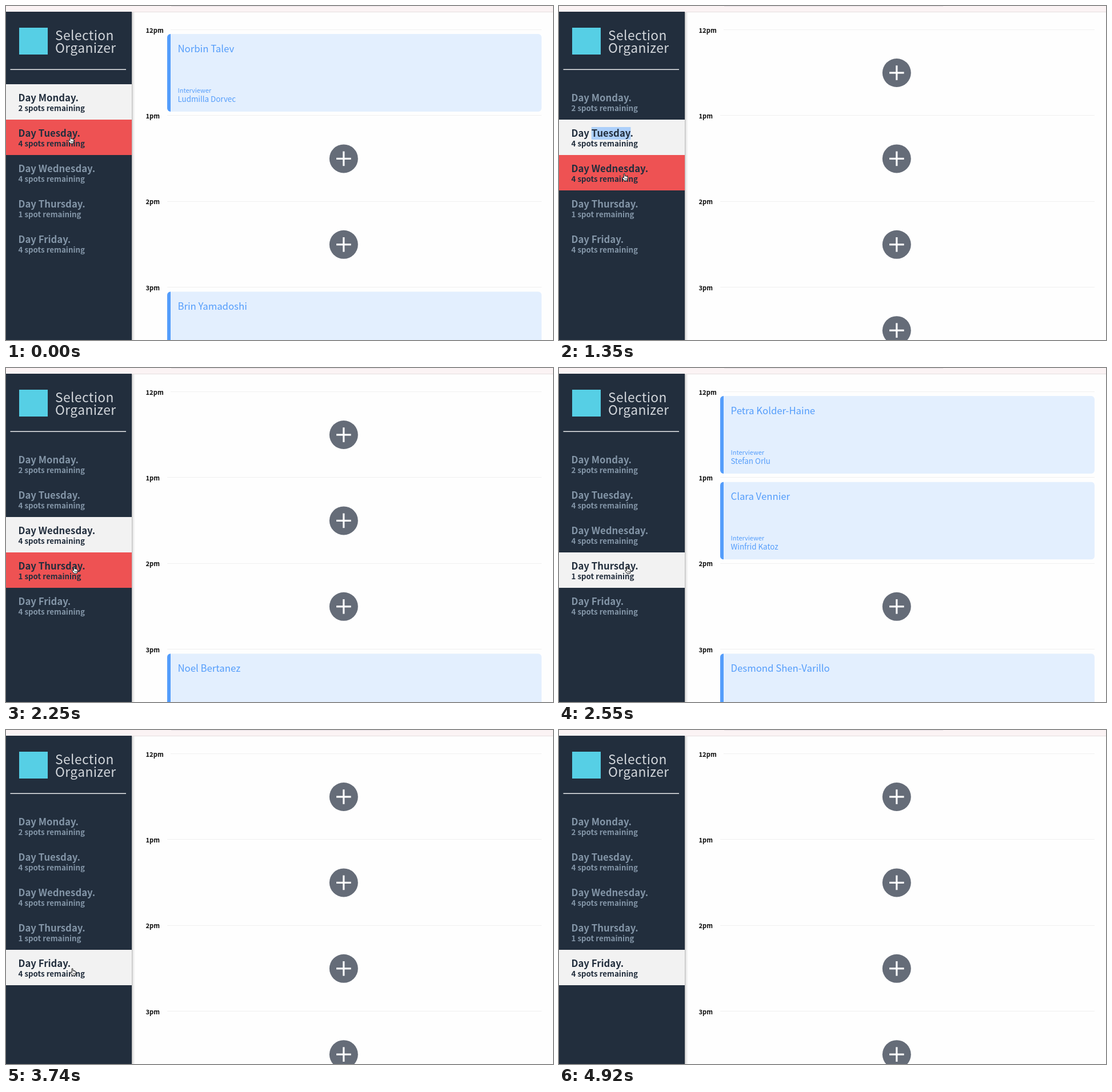
Recreate the animation shown at these times as an HTML page with a canvas. Size 957x585 px, loop 5520 ms.

```html
<!DOCTYPE html>
<html lang="en">
<head>
<meta charset="utf-8">
<title>Day schedule</title>
<style>
  html, body { margin: 0; width: 100%; height: 100%; overflow: hidden; background: #fefefe; }
  canvas { display: block; }
</style>
</head>
<body>
<canvas id="stage" width="957" height="585"></canvas>
<script>
const ctx = document.getElementById('stage').getContext('2d');
const LOOP = 5520;
const SANS = '"Noto Sans CJK JP", "Noto Sans CJK SC", "Noto Sans CJK", "Source Sans Pro", "Noto Sans", sans-serif';
const LIGHT = '"Noto Sans CJK JP Light", "Noto Sans CJK SC Light", ' + SANS;
const NAVY = '#222e3d', MUTED = '#8395a7', PALE = '#f2f2f2', RED = '#ee5253', BLUE = '#549dfb';

const HOURS = ['12pm', '1pm', '2pm', '3pm'];
const ROW = 150.4;
const DAYS = [
  { name: 'Monday', spots: 2, booked: { 0: ['Norbin Talev', 'Ludmilla Dorvec'], 3: ['Brin Yamadoshi'] } },
  { name: 'Tuesday', spots: 4, booked: {} },
  { name: 'Wednesday', spots: 4, booked: { 3: ['Noel Bertanez'] } },
  { name: 'Thursday', spots: 1, booked: {
    0: ['Petra Kolder-Haine', 'Stefan Orlu'],
    1: ['Clara Vennier', 'Winfrid Katoz'],
    3: ['Desmond Shen-Varillo'] } },
  { name: 'Friday', spots: 4, booked: {} }
];

// Each step starts with its time in ms.
const SELECTED = [[0, 0], [600, 1], [1650, 2], [2550, 3], [3740, 4]];
const HOVERED = [[0, 1], [1050, 2], [2250, 3], [2990, 4]];
const POINTER = [
  [0, 108.5, 228], [1050, 113, 294.5], [1350, 110, 293], [2100, 114.5, 314.5],
  [2250, 115, 347], [2840, 118.5, 384.5], [2990, 115, 407], [3140, 111, 415],
  [3290, 112, 417], [4040, 188.5, 415], [4180, 814.5, 518.5], [4330, 821.5, 522.5],
  [4470, 889.5, 552.5], [4620, 906.5, 569.5], [4770, 911.5, 580.5], [4920, 0, 700]
];

const HAND = new Path2D('M3.1 1.3Q4 0 5 1.2L5.3 5Q6.3 4.2 7 5.2Q8.1 4.6 8.7 5.7Q10.3 5.3 10.4 7L10.1 10L9 13L4.2 13L1 8.8Q0 7 1.7 6.9L3.5 8Z');
const ARROW = new Path2D('M0 0V12L2.8 9.5L4.6 13.4L6.5 12.6L4.8 8.8L8.7 8.6Z');

const stepAt = (steps, t) => steps.findLast(s => s[0] <= t);

function rect(x, y, w, h, color) {
  ctx.fillStyle = color;
  ctx.fillRect(x, y, w, h);
}

function text(str, x, y, size, weight, color, family = SANS) {
  ctx.font = `${weight} ${size}px ${family}`;
  ctx.fillStyle = color;
  ctx.fillText(str, x, y);
}

function drawAddButton(y) {
  ctx.fillStyle = '#656c78';
  ctx.beginPath();
  ctx.arc(590.8, y, 25, 0, Math.PI * 2);
  ctx.fill();
  rect(578, y - 1.6, 25.6, 3.2, '#fff');
  rect(589.2, y - 12.8, 3.2, 25.6, '#fff');
}

function drawCard(y, [guest, host]) {
  ctx.save();
  ctx.beginPath();
  ctx.roundRect(282, y, 655, 136, 6);
  ctx.clip();
  rect(282, y, 655, 136, '#e3effe');
  rect(282, y, 6, 136, BLUE);
  ctx.restore();
  text(guest, 300.5, y + 31.5, 16.75, 400, BLUE);
  if (host) {
    text('Interviewer', 300.5, y + 103, 11, 300, BLUE, LIGHT);
    text(host, 300.5, y + 118.5, 13.35, 400, BLUE);
  }
}

function drawSchedule(booked) {
  HOURS.forEach((hour, i) => {
    const y = 41.5 + i * ROW;
    text(hour, 244.5, y + 5, 11.2, 700, '#0b0b0b');
    rect(i ? 282 : 288, Math.floor(y), 937 - (i ? 282 : 288), 1, '#f0f0f0');
    if (booked[i]) drawCard(y + 7.5, booked[i]);
    else drawAddButton(y + 75.5);
  });
}

function drawDay(day, i, selected, hovered, marked) {
  const y = 137 + i * 62;
  const active = selected || hovered;
  if (active) rect(0, y, 220, 62, selected ? PALE : RED);
  if (marked) {
    ctx.font = `700 16.75px ${SANS}`;
    rect(21.5 + ctx.measureText('Day ').width, y + 13, ctx.measureText(day.name).width, 22, '#accffa');
  }
  const color = active ? NAVY : MUTED;
  text(`Day ${day.name}.`, 21.5, y + 29.5, 16.75, 700, color);
  text(`${day.spots} spot${day.spots > 1 ? 's' : ''} remaining`, 21.5, y + 46.5, 13.35, 700, color);
}

function drawSidebar(current, hover, marked) {
  const shade = ctx.createLinearGradient(220, 0, 226, 0);
  shade.addColorStop(0, 'rgba(0,0,0,.28)');
  shade.addColorStop(0.35, 'rgba(0,0,0,.09)');
  shade.addColorStop(1, 'rgba(0,0,0,0)');
  rect(220, 11, 6, 574, shade);
  rect(0, 10, 220, 575, NAVY);

  rect(23, 38, 50, 47, '#56cfe5');
  ctx.letterSpacing = '0.4px';
  text('Selection', 86, 59.5, 22.8, 300, '#d3d7dc', LIGHT);
  text('Organizer', 86, 82, 22.8, 300, '#d3d7dc', LIGHT);
  ctx.letterSpacing = '0px';
  rect(7.5, 110.5, 202.5, 1.5, '#e9ebed');

  DAYS.forEach((day, i) => drawDay(day, i, i === current, i === hover, marked && i === current));
}

function drawPointer(x, y) {
  const onDays = x < 220;
  const shape = onDays ? HAND : ARROW;
  ctx.save();
  ctx.translate(x, y);
  ctx.lineJoin = 'round';
  ctx.lineWidth = onDays ? 1 : 1.4;
  ctx.fillStyle = onDays ? '#fff' : '#000';
  ctx.strokeStyle = onDays ? '#111' : '#fff';
  if (onDays) {
    ctx.fill(shape);
    ctx.stroke(shape);
    ctx.lineWidth = 0.7;
    ctx.stroke(new Path2D('M5.2 8.6V11M6.8 8.6V11M8.4 8.6V11'));
  } else {
    ctx.stroke(shape);
    ctx.fill(shape);
  }
  ctx.restore();
}

function draw(t) {
  const current = stepAt(SELECTED, t)[1];
  const hover = stepAt(HOVERED, t)[1];
  const [, x, y] = stepAt(POINTER, t);

  rect(0, 0, 957, 585, '#fefefe');
  rect(0, 0, 957, 10, '#fbf3f4');
  rect(289, 0, 383, 1, '#e8e0e3');
  rect(0, 10, 957, 1, '#e5dfe0');
  drawSchedule(DAYS[current].booked);
  drawSidebar(current, hover, current === 1);
  drawPointer(x, y);
}

const start = performance.now();
function tick() {
  draw((performance.now() - start) % LOOP);
  requestAnimationFrame(tick);
}
tick();
</script>
</body>
</html>
```
